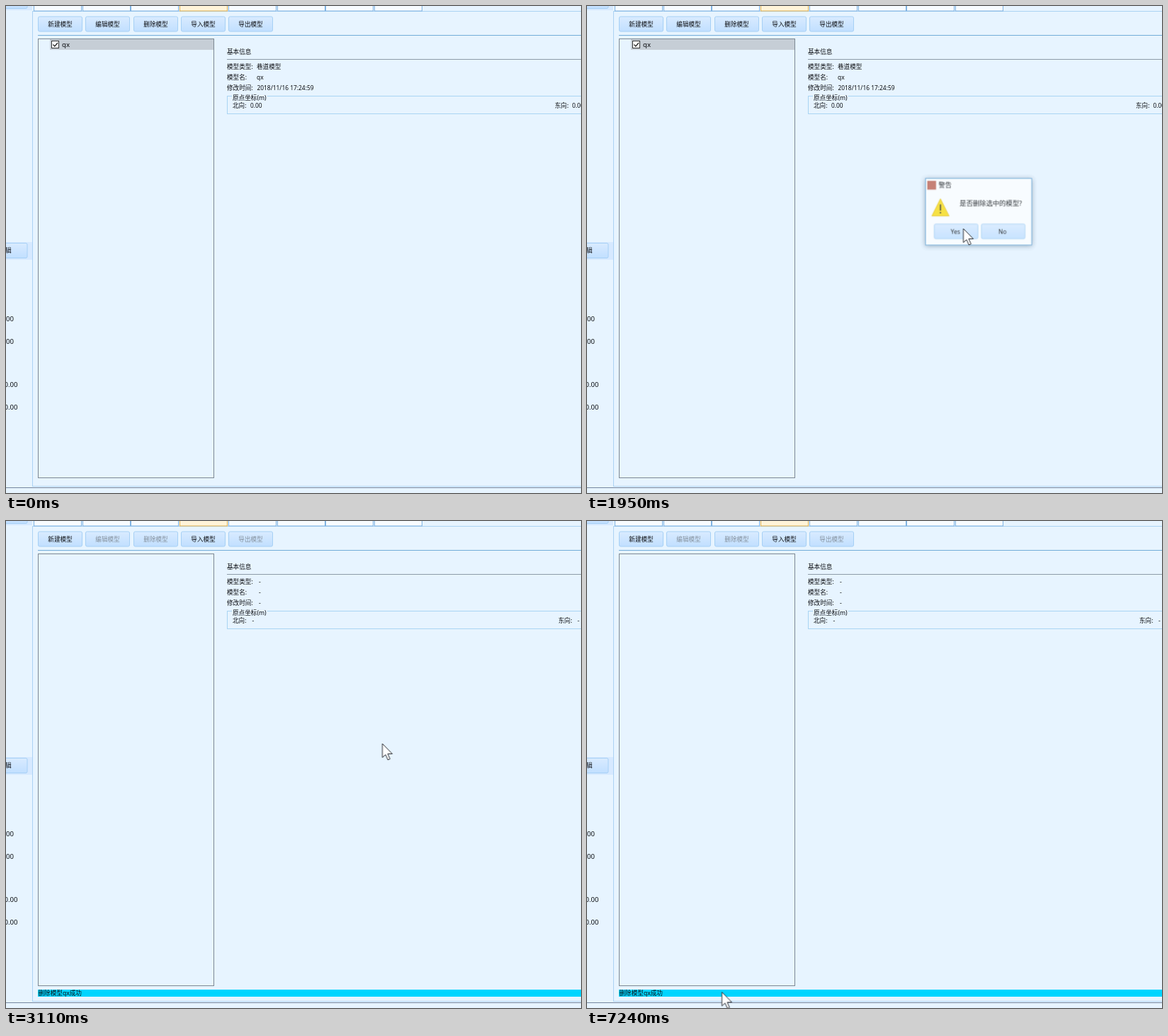
An HTML page for the animation above (8 s loop, 812 by 689 pixels).

```html
<!DOCTYPE html>
<html lang="zh">
<head>
<meta charset="utf-8">
<title>模型管理</title>
<style>
@property --bar { syntax: "<length>"; inherits: true; initial-value: 0px; }
html, body { margin: 0; width: 100%; height: 100%; overflow: hidden; background: #e7f4ff; }
body { font: 500 8.6px "Noto Sans", "Noto Sans CJK SC", "Noto Sans CJK", sans-serif; color: #0b0d10; }
svg, .list, .status { position: absolute; }
svg { left: 0; top: 0; width: 812px; height: 689px; overflow: hidden; }
text { fill: #0b0d10; white-space: pre; }
.mid { text-anchor: middle; }
.off text { fill: #84909c; }
.num { font-size: 9.6px; font-weight: 400; }
.thin { font-weight: 400; }
.button { fill: url(#face); stroke: #a6d0f5; }

.list { box-sizing: border-box; left: 45px; top: 46px; width: 249px; height: calc(622px - var(--bar)); border: 1px solid #7d8892; }
.status { left: 45px; top: calc(673px - var(--bar)); width: 767px; height: var(--bar); overflow: hidden; background: #00d5ff; }
.status span { position: absolute; left: .5px; top: 50%; line-height: 12px; margin-top: -6.3px; white-space: pre; }

body, .before, .after, .dialog, .close, .cursor { animation: 8s step-end infinite; }
body { animation-name: grow; }
.before { animation-name: leave; }
.after { animation-name: arrive; }
.close { animation-name: unfocus; }
.dialog { animation-name: popup; transform-origin: 552.5px 290.5px; }
.cursor { animation-name: point; }

@keyframes leave { 0% { visibility: visible } 25.375%, 100% { visibility: hidden } }
@keyframes arrive { 0% { visibility: hidden } 25.375%, 100% { visibility: visible } }
@keyframes unfocus { 0% { opacity: 1 } 23.375%, 100% { opacity: 0 } }
@keyframes grow {
  0% { --bar: 0px } 29.125% { --bar: 1px } 30.125% { --bar: 2px }
  32% { --bar: 3px } 33% { --bar: 4px } 35.125% { --bar: 6px }
  36.125% { --bar: 7px } 37% { --bar: 8px } 38% { --bar: 9px }
  38.875%, 100% { --bar: 10px }
}
@keyframes popup {
  0% { opacity: 0; transform: scale(.92) }
  11.75% { opacity: .5; transform: scale(.96) }
  12.7% { opacity: .88; transform: scale(.99) }
  13.6% { opacity: 1; transform: none }
  23.375% { opacity: .96; transform: none }
  24.375% { opacity: .8; transform: scale(.993) }
  25.375% { opacity: .3; transform: scale(.96) }
  26.25%, 100% { opacity: 0; transform: scale(.92) }
}
@keyframes point {
  0% { opacity: 0; transform: translate(648px, 565px) }
  .875% { opacity: 1; transform: translate(648px, 565px) }
  1.875% { transform: translate(612px, 500px) }
  2.875% { transform: translate(545px, 375px) }
  3.875% { transform: translate(475px, 255px) }
  4.875% { transform: translate(416px, 166px) }
  5.875% { transform: translate(325px, 72px) }
  6.875% { transform: translate(255px, 14px) }
  7.875% { transform: translate(220px, 4px) }
  8.875% { transform: translate(210.5px, 24px) }
  15.625% { transform: translate(218px, 30px) }
  16.5% { transform: translate(265px, 65px) }
  17.5% { transform: translate(345px, 125px) }
  18.5% { transform: translate(425px, 195px) }
  19.5% { transform: translate(500px, 275px) }
  20.375% { transform: translate(533px, 313px) }
  21.375% { opacity: 1; transform: translate(531.5px, 315px) }
  66% { transform: translate(526.5px, 319.5px) }
  67% { transform: translate(502px, 349px) }
  68% { transform: translate(455px, 410px) }
  69% { transform: translate(395px, 471px) }
  69.875% { transform: translate(355px, 512px) }
  70.875% { transform: translate(315px, 544px) }
  71.875% { transform: translate(270px, 592px) }
  72.875% { transform: translate(237px, 624px) }
  73.875% { transform: translate(212px, 645px) }
  74.75% { transform: translate(196px, 659px) }
  75.75% { transform: translate(190px, 665px) }
  89.5% { transform: translate(190.5px, 665.5px) }
  90.5%, 100% { opacity: 1; transform: translate(190.5px, 666.5px) }
}
</style>
</head>
<body>
<svg viewBox="0 0 812 689">
  <defs>
    <linearGradient id="face" x2="0" y2="1">
      <stop stop-color="#d9ebff"/><stop offset="1" stop-color="#c1dfff"/>
    </linearGradient>
    <rect id="plate" class="button" x="-31" y="-10.5" width="62" height="21" rx="2"/>
  </defs>

  <!-- side panel -->
  <path d="M0 0H37V6H0ZM0 334H37V359H0Z" fill="#d6e9ff"/>
  <path d="M37.5 7V680M38 7.5H812" stroke="#abd2f3" fill="none"/>
  <rect class="button" x="-32" y="-18" width="62" height="21.5" rx="2"/>
  <rect class="button" x="-32" y="335.5" width="62" height="21" rx="2"/>
  <text x="-1" y="349">辑</text>
  <g class="num">
    <text x="0" y="446">00</text><text x="0" y="477.5">00</text>
    <text x="-2.5" y="539">0.00</text><text x="-2.5" y="570.5">0.00</text>
  </g>
  <path d="M38 679.5H812" stroke="#b4d6f2"/>
  <path d="M0 681.5H812" stroke="#75869e"/>

  <g id="tabs" fill="#f8fcff" stroke="#80b3e2"></g>

  <g id="toolbar"></g>
  <path d="M45 41.5H812" stroke="#72add9"/>

  <!-- details -->
  <text x="312" y="68.3">基本信息</text>
  <path d="M312 75.5H812" stroke="#8c9ba8"/>
  <text x="312" y="89.2">模型类型:</text>
  <text x="312" y="104.2">模型名:</text>
  <text x="312" y="119.2">修改时间:</text>
  <rect x="312.5" y="127.5" width="520" height="25" fill="none" stroke="#a9d4f3"/>
  <path d="M319 127.5H369" stroke="#e7f4ff" stroke-width="2"/>
  <text x="320" y="133.4">原点坐标(m)</text>
  <text x="320" y="143.8">北向:</text>

  <g class="before">
    <rect x="62" y="47" width="231" height="15" fill="#c6ced6"/>
    <rect x="64.5" y="49.5" width="10" height="10" fill="#fff" stroke="#333"/>
    <path d="M66.5 54.5L68.8 57 73 52" fill="none" stroke="#222" stroke-width="1.2"/>
    <text class="num" x="79" y="58">qx</text>
    <text x="354" y="89.2">巷道模型</text>
    <g class="thin" font-size="8.4">
      <text x="354" y="104">qx</text>
      <text x="354.5" y="119">2018/11/16 17:24:59</text>
      <text x="345" y="143.8">0.00</text>
      <text x="799.5" y="143.8">0.00</text>
    </g>
    <text x="775" y="143.8">东向:</text>
  </g>
  <g class="after">
    <text x="357" y="89">-</text><text x="357" y="104">-</text><text x="357" y="119">-</text>
    <text x="347.5" y="143.8">-</text>
    <text x="780" y="143.8">东向:</text><text x="807" y="143.8">-</text>
  </g>
</svg>

<div class="list"></div>
<div class="status"><span>删除模型qx成功</span></div>

<svg viewBox="0 0 812 689">
  <g class="dialog">
    <rect x="477.5" y="243.5" width="151" height="95" fill="#fdfeff" stroke="#5d9fd3"
      style="filter: drop-shadow(0 1px 4px #4a627a99)"/>
    <rect x="480" y="247" width="12.5" height="12.5" fill="#bf6554"/>
    <text class="thin" x="496" y="256.6" font-size="9.4">警告</text>
    <path class="close" d="M612 249.2L620.3 257.5M620.3 249.2L612 257.5" stroke="#333"/>
    <path d="M498.7 272.5L511 297H486.5Z" fill="#fbdc16" stroke="#eac51c" stroke-linejoin="round"/>
    <path d="M498.7 280.5V289.5M498.7 291.5V293.5" stroke="#222" stroke-width="1.6"/>
    <text class="thin" x="526" y="282.2" font-size="9.4">是否删除选中的模型?</text>
    <g class="mid thin">
      <g transform="translate(521 319)"><use href="#plate"/><text x="-1" y="3.2">Yes</text></g>
      <g transform="translate(588 319)"><use href="#plate"/><text x="-1" y="3.2">No</text></g>
    </g>
  </g>
  <path class="cursor" d="M0 0V19.6L4.5 15.6 7.8 23 10.8 21.7 7.6 14.4H14Z" fill="#fff" stroke="#26292e"/>
</svg>

<script>
const tabs = Array.from({ length: 8 }, (_, i) => {
  const active = i === 3 ? 'fill="#fff4d9" stroke="#e3b04b"' : '';
  return `<rect x="${Math.round(39 + 68.7 * i) + .5}" y="-10.5" width="67" height="17.5" ${active}/>`;
});
document.getElementById('tabs').innerHTML = tabs.join('');

const button = (label, i, state) =>
  `<g class="mid ${state}" transform="translate(${Math.round(76 + 67.25 * i) + .5} 25.5)">
    <use href="#plate"/><text y="3.2">${label}</text></g>`;
const labels = ['新建模型', '编辑模型', '删除模型', '导入模型', '导出模型'];
const needsModel = [1, 2, 4];
document.getElementById('toolbar').innerHTML = labels.map((label, i) =>
  needsModel.includes(i)
    ? button(label, i, 'before') + button(label, i, 'after off')
    : button(label, i, '')
).join('');
</script>
</body>
</html>
```
